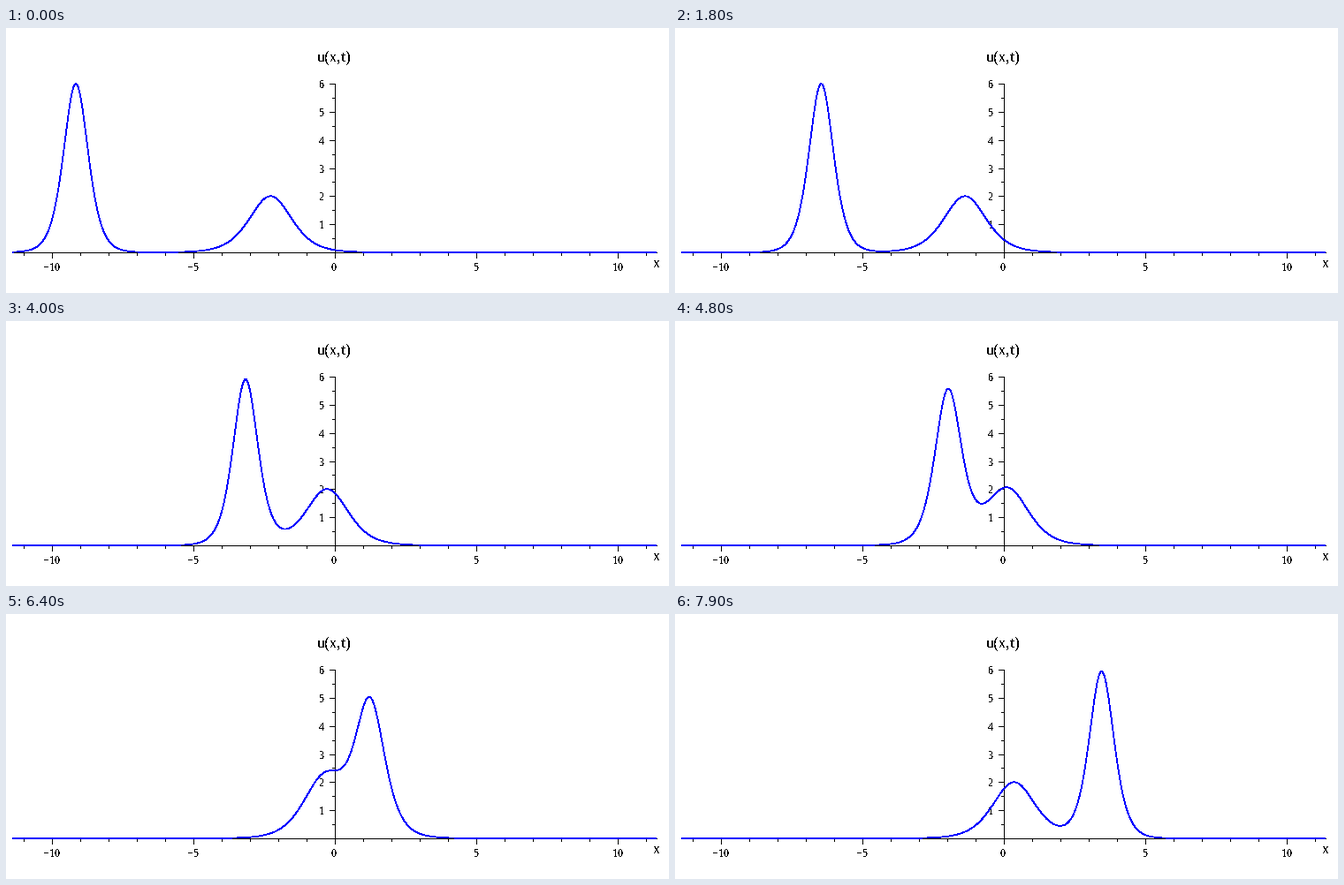
A matplotlib script that plays this animation: 750 by 300 pixels, repeating every 8000 ms.

```python
import numpy as np
import matplotlib.pyplot as plt
from matplotlib.animation import FuncAnimation

W, H, DPI = 750, 300, 100
PX = 72 / DPI                 # points per pixel
X0, Y0 = 372.5, 254.5         # axis origin, at a pixel centre
XU, YU = 32, 191 / 6          # pixels per unit
FRAMES, STEP_MS = 80, 100
T0, DT = -0.7305, 0.0125

plt.rcParams.update({
    "font.family": "Liberation Serif",
    "text.antialiased": False,
    "text.hinting": "native",
    "text.hinting_factor": 1,
})

fig = plt.figure(figsize=(W / DPI, H / DPI), dpi=DPI, facecolor="white")
ax = fig.add_axes([0, 0, 1, 1])
ax.set_xlim(0, W)
ax.set_ylim(H, 0)
ax.axis("off")


def two_solitons(x, t):
    """KdV solution with amplitudes 6 and 2, meeting at t = 0."""
    k1, k2 = np.sqrt(3), 1.0
    c = (k1 + k2) / (k1 - k2)
    a, b = k1 * (x - 12 * t), x - 4 * t
    p, q, dp, dq = a + b, a - b, k1 + k2, k1 - k2
    g = np.cosh(p) + c * np.cosh(q)
    g1 = dp * np.sinh(p) + c * dq * np.sinh(q)
    g2 = dp**2 * np.cosh(p) + c * dq**2 * np.cosh(q)
    return 2 * (g2 / g - (g1 / g) ** 2)


def line(xs, ys, color, width, z):
    """Hard-edged line; every pixel it touches is filled."""
    return ax.plot(xs, ys, color=color, lw=width * PX, aa=False, snap=False,
                   solid_capstyle="butt", solid_joinstyle="round", zorder=z)[0]


def segment(x1, y1, x2, y2):
    line([x1, x2], [y1, y2], "black", 0.5, 1)


def label(x, y, text, size):
    ax.text(x, y, text, fontsize=size * PX, ha="center", va="baseline",
            zorder=2)


segment(8, Y0, 736.5, Y0)
segment(X0, 63, X0, Y0)

for n in range(-11, 12):
    x = X0 + XU * n
    segment(x, Y0, x, Y0 + (6.4 if n % 5 == 0 else 3.4))
for n in (-10, -5, 0, 5, 10):
    x = X0 + XU * n - (1.5 if n == 0 else 0.5)
    label(x, 275, str(n).replace("-", "\u2212"), 13)

for n in range(1, 13):
    y = np.floor(Y0 - YU * n / 2) + 0.5
    segment(X0 - (3.4 if n % 2 else 6.4), y, X0, y)
    if n % 2 == 0:
        label(357, y + 4.5, str(n // 2), 13)

label(371.5, 38, "u(x,t)", 18)
label(735.5, 271, "x", 18)

xs = np.linspace(-11.375, 11.375, 500)
curve = line([], [], "#0000ff", 0.8, 3)


def update(i):
    u = two_solitons(xs, T0 + DT * i)
    curve.set_data(X0 - 0.8 + XU * xs, Y0 - 0.5 - YU * u)
    return curve,


anim = FuncAnimation(fig, update, frames=FRAMES, interval=STEP_MS,
                     repeat=True, blit=False)
plt.show()
```
